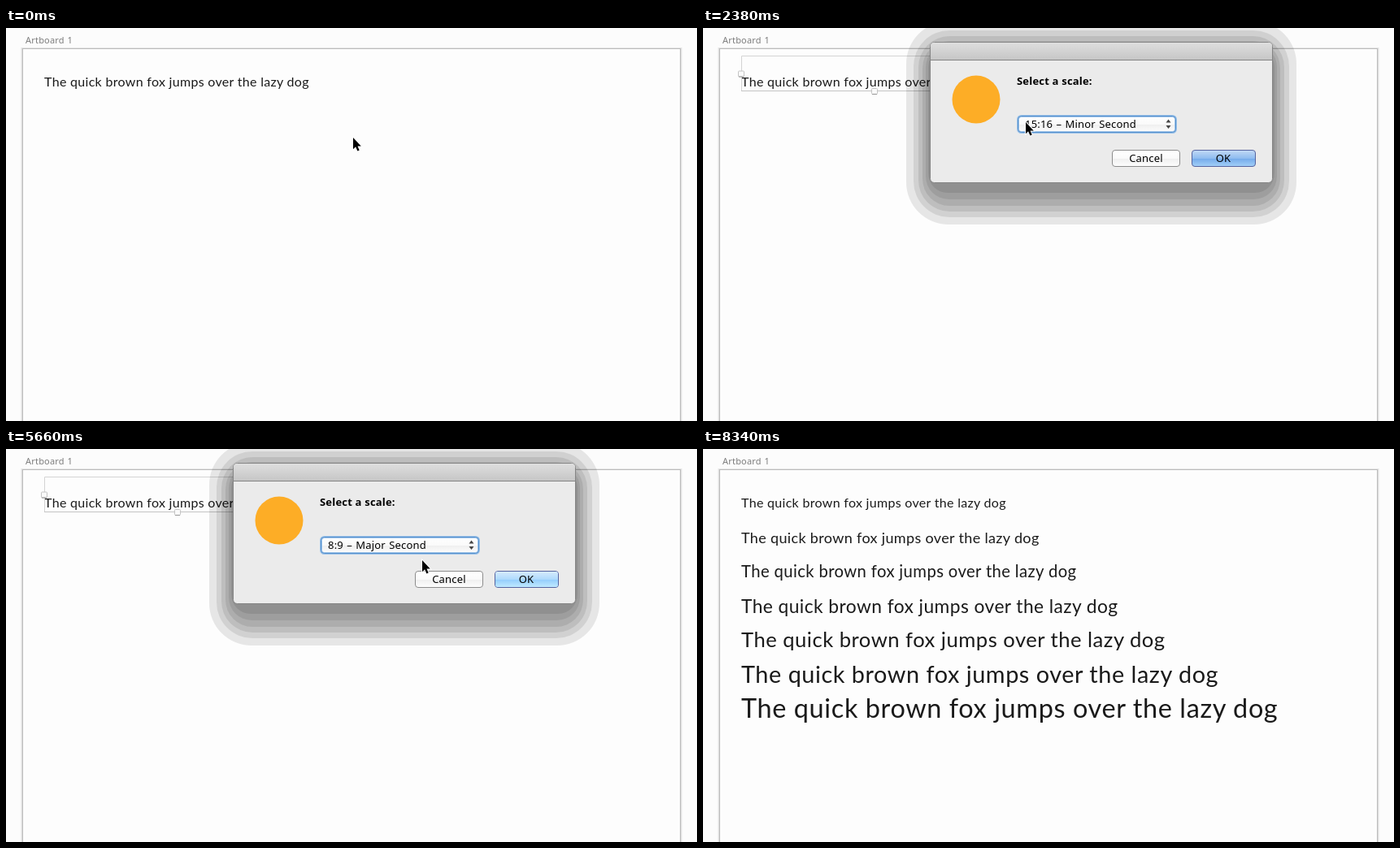
Write an HTML page that moves like this. It is 850 by 484 pixels and loops after 8550 ms.

```html
<!DOCTYPE html>
<html lang="en">
<head>
<meta charset="utf-8">
<title>Type scale</title>
<style>
html, body { margin: 0; width: 100%; height: 100%; overflow: hidden; background: #fcfcfc; }
svg { display: block; width: 850px; height: 484px; }
text { font-family: "Noto Sans", "Open Sans", sans-serif; font-size: 13px; letter-spacing: .2px; word-spacing: .7px; fill: #000; }
.label { font-size: 11px; fill: #7c7c7c; }
.bold { font-weight: 700; word-spacing: 0; }
.sample { font-family: Lato, "Open Sans", sans-serif; letter-spacing: .02em; word-spacing: -.005em; fill: #1a1a1a; }
.shade { fill: #000; fill-opacity: .09; }

/* every timeline shares one 8550 ms loop */
#cursor, #frame, #dialog, #light, #before, #after, #menu, #bar, #tick, #results, .row {
  animation: 8550ms step-end infinite;
}
#cursor { animation-name: cursor; }
#frame { animation-name: frame; }
#dialog { animation-name: dialog; transform-origin: 490px 104px; }
#light { animation-name: pulse; }
#before { animation-name: before; }
#after { animation-name: after; }
#menu { animation-name: menu; }
#bar { animation-name: bar; }
#tick { animation-name: tick; }
#results { animation-name: results; }
.row:nth-of-type(1) { animation-name: first; }
.row:nth-of-type(2) { animation-name: second; }

@keyframes cursor {
  0% { transform: translate(427px, 135px); }
  1.63% { transform: translate(427px, 135px); animation-timing-function: steps(4, start); }
  8.65% { transform: translate(355px, 66px); }
  13.91% { transform: translate(355px, 66px); animation-timing-function: steps(5, start); }
  22.69% { transform: translate(397px, 116px); }
  38.24% { transform: translate(397px, 116px); animation-timing-function: steps(5, start); }
  47.01% { transform: translate(516px, 123px); }
  50.52% { transform: translate(516px, 123px); animation-timing-function: steps(3, start); }
  55.43% { transform: translate(512px, 137px); }
  67.95% { transform: translate(512px, 137px); animation-timing-function: steps(5, start); }
  76.72% { transform: translate(638px, 156px); }
  89% { transform: translate(638px, 156px); animation-timing-function: steps(6, start); }
  99.23%, 100% { transform: translate(815px, 495px); }
}
@keyframes frame {
  0% { opacity: 0; }
  13.91% { opacity: 1; }
  97.54%, 100% { opacity: 0; }
}
@keyframes dialog {
  0% { opacity: 0; transform: scale(.252); }
  24.44% { opacity: .25; transform: scale(.252); }
  26.08% { opacity: .95; transform: scale(1.1); }
  27.83% { opacity: 1; transform: none; }
  76.72%, 100% { opacity: 0; transform: none; }
}
@keyframes pulse {
  0% { opacity: 0; }
  27.83% { opacity: 0; animation-timing-function: steps(3); }
  32.98% { opacity: 1; animation-timing-function: steps(3); }
  38.24% { opacity: 0; animation-timing-function: steps(4); }
  45.26% { opacity: 1; }
  66.19% { opacity: 1; animation-timing-function: steps(3); }
  70.17% { opacity: 0; animation-timing-function: steps(3); }
  74.96%, 100% { opacity: 1; }
}
@keyframes before { 0% { opacity: 1; } 66.19%, 100% { opacity: 0; } }
@keyframes after { 0% { opacity: 0; } 66.19%, 100% { opacity: 1; } }
@keyframes menu {
  0% { opacity: 0; }
  48.77% { opacity: 1; }
  66.19%, 100% { opacity: 0; }
}
@keyframes bar { 0% { transform: none; } 52.16%, 100% { transform: translateY(18px); } }
@keyframes tick { 0% { stroke: #fff; } 52.16%, 100% { stroke: #000; } }
@keyframes first { 0% { fill: #fff; } 52.16%, 100% { fill: #000; } }
@keyframes second { 0% { fill: #000; } 52.16%, 100% { fill: #fff; } }
@keyframes results { 0% { opacity: 0; } 78.47%, 100% { opacity: 1; } }
</style>
</head>
<body>
<svg viewBox="0 0 850 484" xmlns="http://www.w3.org/2000/svg">
  <defs>
    <linearGradient id="title" x2="0" y2="1"><stop stop-color="#dedede"/><stop offset="1" stop-color="#c6c6c6"/></linearGradient>
    <linearGradient id="white" x2="0" y2="1"><stop stop-color="#fff"/><stop offset=".5" stop-color="#fafafa"/><stop offset=".52" stop-color="#efefef"/><stop offset="1" stop-color="#fdfdfd"/></linearGradient>
    <linearGradient id="blue" x2="0" y2="1"><stop stop-color="#c3daf5"/><stop offset=".5" stop-color="#8fbcf0"/><stop offset=".52" stop-color="#74aaea"/><stop offset="1" stop-color="#a3d0f8"/></linearGradient>
    <linearGradient id="sky" x2="0" y2="1"><stop stop-color="#d6ebfd"/><stop offset=".5" stop-color="#aedafc"/><stop offset=".52" stop-color="#93cdfc"/><stop offset="1" stop-color="#bfe9ff"/></linearGradient>
    <linearGradient id="pick" x2="0" y2="1"><stop stop-color="#5083f3"/><stop offset="1" stop-color="#1c57f0"/></linearGradient>
    <g id="handle">
      <rect x="-3.5" y="-3.5" width="7" height="7" rx="1" fill="#fafafa" stroke="#c4c4c4"/>
      <path d="M-3 3.5H3" stroke="#969696"/>
    </g>
  </defs>

  <rect width="850" height="484" fill="#fcfcfc"/>
  <text class="label" x="24" y="19">Artboard 1</text>
  <rect x="18.5" y="24.5" width="813" height="470" fill="none" stroke="#f0f0f0"/>
  <rect x="19.5" y="25" width="811" height="470" fill="none" stroke="#dedede"/>
  <rect x="20.5" y="25.5" width="809" height="470" fill="#fdfdfd" stroke="#bcbcbc"/>

  <g id="lines"></g>
  <g id="results"></g>

  <g id="frame">
    <path d="M47.5 78V34.5H374.5" fill="none" stroke="#d4d4d4"/>
    <path d="M374.5 34V77.5H47" fill="none" stroke="#c4c4c4"/>
    <use href="#handle" x="47" y="56.5"/>
    <use href="#handle" x="375" y="56.5"/>
    <use href="#handle" x="211" y="78"/>
  </g>

  <g id="dialog">
    <g class="shade">
      <rect x="250" y="-8" width="480" height="250" rx="52"/>
      <rect x="259" y="3" width="462" height="230" rx="44"/>
      <rect x="265" y="10" width="450" height="216" rx="38"/>
      <rect x="270" y="16" width="440" height="203" rx="33"/>
      <rect x="274" y="20" width="432" height="191" rx="28"/>
      <rect x="277" y="24" width="426" height="179" rx="24"/>
    </g>
    <rect x="279.5" y="17.5" width="421" height="173" rx="5" fill="#ebebeb" stroke="#858585"/>
    <path d="M280 39V22a4 4 0 0 1 4-4H696a4 4 0 0 1 4 4V39Z" fill="url(#title)"/>
    <path d="M280 39.5H700" stroke="#858585"/>

    <circle cx="336" cy="88" r="29.5" fill="#fdad26"/>
    <text class="bold" x="386" y="70">Select a scale:</text>

    <rect x="387.5" y="108.5" width="194" height="20" rx="4" fill="url(#white)" stroke="#9cc3ea" stroke-width="3"/>
    <rect x="387.5" y="108.5" width="194" height="20" rx="4" fill="none" stroke="#5790cb"/>
    <path d="M569.5 116.5L572.5 112.5L575.5 116.5ZM569.5 120L572.5 124L575.5 120Z" fill="#444"/>
    <text id="before" x="396" y="123">15:16 – Minor Second</text>
    <text id="after" x="396" y="123">8:9 – Major Second</text>

    <rect x="503.5" y="150.5" width="83" height="20" rx="3.5" fill="url(#white)" stroke="#8c8c8c"/>
    <text x="545" y="165" text-anchor="middle">Cancel</text>
    <rect x="601.5" y="150.5" width="78" height="20" rx="3.5" fill="url(#blue)" stroke="#5564a0"/>
    <rect id="light" x="602" y="151" width="77" height="19" rx="3" fill="url(#sky)"/>
    <text x="640" y="165" text-anchor="middle">OK</text>
  </g>

  <g id="menu">
    <g class="shade">
      <rect x="370" y="108" width="248" height="326" rx="12"/>
      <rect x="372" y="110" width="244" height="319" rx="10"/>
      <rect x="373" y="111" width="242" height="315" rx="9"/>
      <rect x="374" y="112" width="240" height="311" rx="8"/>
    </g>
    <rect x="374.5" y="105.5" width="239" height="315" rx="5" fill="#fdfdfd" stroke="#bdbdbd"/>
    <rect id="bar" x="375" y="110" width="238" height="18" fill="url(#pick)"/>
    <path id="tick" d="M381.5 118.5L384 122L388.8 113.5" fill="none" stroke-width="1.8"/>
    <g id="rows"></g>
  </g>

  <path id="cursor" d="M0 0V14.2L3.1 11.3L5.4 16.5L7.7 15.5L5.5 10.5H9.8Z" fill="#000" stroke="#fff" stroke-width="1.8" paint-order="stroke"/>
</svg>
<script>
const scales = [
  "15:16 – Minor Second", "8:9 – Major Second", "5:6 – Minor Third", "4:5 – Major Third",
  "3:4 – Perfect Fourth", "1:√2 – Aug. Fourth / Dim. Fifth", "2:3 – Perfect Fifth",
  "5:8 – Minor Sixth", "1:1.618 – Golden Section", "3:5 – Major Sixth", "9:16 – Minor Seventh",
  "8:15 – Major Seventh", "1:2 – Octave", "2:5 – Major Tenth", "3:8 – Major Eleventh",
  "1:3 – Major Twelfth", "1:4 – Double Octave"
];
const baselines = [72, 116, 158, 202, 244, 288, 331];
const phrase = "The quick brown fox jumps over the lazy dog";

function addText(parent, cls, x, y, content) {
  const el = document.createElementNS("http://www.w3.org/2000/svg", "text");
  el.setAttribute("class", cls);
  el.setAttribute("x", x);
  el.setAttribute("y", y);
  el.textContent = content;
  document.getElementById(parent).append(el);
  return el;
}

scales.forEach((name, i) => addText("rows", "row", 396, 123 + 18 * i, name));
baselines.forEach((y, i) => {
  const line = addText(i ? "results" : "lines", "sample", 47, y, phrase);
  line.style.fontSize = 16 * (9 / 8) ** i + "px";
});
</script>
</body>
</html>
```
